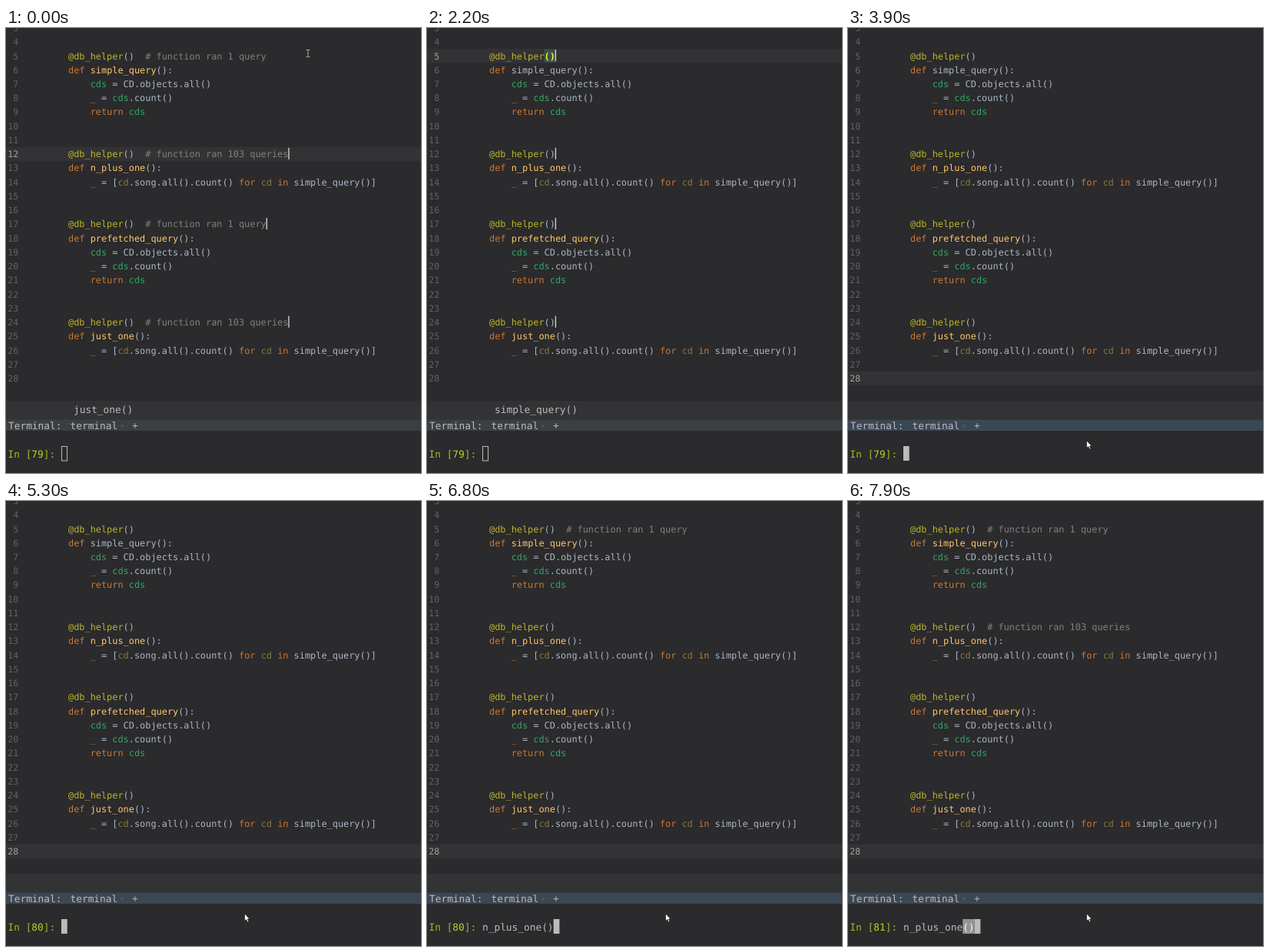
These frames come from a looping animation (540 by 579 pixels, 8000 ms). An HTML page:

```html
<!DOCTYPE html>
<html lang="en">
<head>
<meta charset="utf-8">
<title>Query counter</title>
<style>
html, body { margin: 0; width: 100%; height: 100%; overflow: hidden; background: #2b2a2c; }
svg { display: block; width: 540px; height: 579px; }
text { font-family: "DejaVu Sans Mono", "Noto Sans Mono", monospace; text-rendering: geometricPrecision; fill: #a9b7c6; }
.code { font-size: 11.9px; }
.ui { font-size: 12.82px; fill: #bbbbbb; }
.num { font-size: 11.6px; fill: #606366; }
.on { fill: #a4a3a3; }
.k { fill: #cc7832; }
.d { fill: #bbb529; }
.f { fill: #ffc66d; }
.v { fill: #2fa866; }
.o { fill: #85793a; }
.c { fill: #808080; }
.p { fill: #ffef28; font-weight: bold; }
.g { fill: #a8b820; }
.h { fill: #b9d32c; }
.w { fill: #ffffff; }
</style>
</head>
<body>
<svg id="stage" viewBox="0 0 540 579"></svg>
<script>
const LOOP = 8000;
const CW = 7.164, ROW = 18.24, LEFT = 81;   // editor grid
const TW = 7.72, PROMPT = 72;               // terminal grid
const stage = document.getElementById('stage');

const ONE = '# function ran 1 query';
const MANY = '# function ran 103 queries';
const NOTES = { 5: ONE, 12: MANY, 17: ONE, 24: MANY };
const DELETES = [700, 900, 1000, 1200, 1500, 1800];
const CALL_ALL = '    k{_} = [o{cd}.song.all().count() k{for} o{cd} k{in} simple_query()]';
const BODY = ['    v{cds} = CD.objects.all()', '    k{_} = v{cds}.count()', '    k{return} v{cds}'];
const CODE = {
  6: 'k{def} f{simple_query}():', 7: BODY[0], 8: BODY[1], 9: BODY[2],
  13: 'k{def} f{n_plus_one}():', 14: CALL_ALL,
  18: 'k{def} f{prefetched_query}():', 19: BODY[0], 20: BODY[1], 21: BODY[2],
  25: 'k{def} f{just_one}():', 26: CALL_ALL
};

// Terminal history: start, prompt number, input, delay of the bracket match
const INPUT = [
  [0, 79, ''],
  [4500, 79, 'just_one()'],
  [4700, 79, 'x = prefetched_query()'],
  [4900, 79, 'n_plus_one()'],
  [5100, 79, 'x = simple_query()'],
  [5300, 80, ''],
  [6200, 80, 'x = simple_query()', 0],
  [6400, 80, 'just_one()'],
  [6600, 80, 'x = prefetched_query()'],
  [6800, 80, 'n_plus_one()'],
  [7000, 81, ''],
  [7800, 81, 'n_plus_one()']
];

// Pointer path: time, x, y
const PATH = [
  [0, 393, 33], [100, 393, 33], [300, 390, 33], [2300, 368, 285], [2800, 330, 456],
  [3200, 316, 514], [3600, 310.5, 537], [LOOP, 310.5, 537]
];

const nb = s => s.replace(/ /g, '\u00a0');
const rowTop = n => 27.2 + ROW * (n - 5);
const rect = (x, y, w, h, fill, extra = '') =>
  `<rect x="${x}" y="${y}" width="${w}" height="${h}" fill="${fill}" ${extra}/>`;
const text = (x, y, cls, s) => `<text x="${x}" y="${y}" class="${cls}">${s}</text>`;
const span = (cls, s) => `<tspan class="${cls}">${s}</tspan>`;
const paint = s => nb(s).replace(/([a-z])\{([^}]*)\}/g, (_, cls, word) => span(cls, word));
const caret = (n, col) => rect(LEFT + col * CW - 0.3, rowTop(n) + 1, 1.4, 15, '#d0d0d0');

function note(n, t) {
  if ((n === 5 && t >= 5500) || (n === 12 && t >= 7200)) return '  ' + NOTES[n];
  const gone = DELETES.filter(d => t >= d).length;
  if (gone === 0) return '  ' + NOTES[n];
  if (gone > 5) return '';
  const words = NOTES[n].split(' ').slice(0, 5 - gone);
  return '  ' + words.map(w => w + ' ').join('');
}

function pointerAt(t) {
  const i = PATH.findIndex(p => p[0] > t);
  const a = PATH[i - 1], b = PATH[i];
  const u = (t - a[0]) / (b[0] - a[0]);
  return [a[1] + (b[1] - a[1]) * u, a[2] + (b[2] - a[2]) * u];
}

function pointer(t, hidden) {
  if (t >= 1800 && t < 2400) return '';
  const [x, y] = pointerAt(t);
  if (y > 505 && !hidden) {
    return `<path transform="translate(${x} ${y})" d="M0 0V9.4L2.2 7.5L3.7 11L5.3 10.3L3.8 6.9H6.6Z" fill="#fff" stroke="#111" stroke-width=".6"/>`;
  }
  const dy = hidden ? 1 : 0;
  return `<path transform="translate(${x + (hidden ? 1 : 0)} ${y + dy})" d="M-2.4 -4.6H-.6L0 -4L.6 -4.6H2.4M0 -4V4M-2.4 4.6H-.6L0 4L.6 4.6H2.4" fill="none" stroke="#b4b4b4" stroke-width="1"/>`;
}

function editor(t, hidden) {
  const current = t < 100 ? 12 : t < 2800 ? 5 : 28;
  const multi = t < 2800;
  const matched = t >= 2000 && multi;
  const dim = t >= 1800 && t < 5700;
  let s = rect(0, rowTop(current), 540, ROW, '#333234');
  if (matched) s += rect(LEFT + 10 * CW, rowTop(5) + 0.5, 2 * CW, 17, '#3b514d');
  for (let n = 3; n <= 28; n++) {
    const y = rowTop(n) + 13.3;
    const label = String(n);
    s += text(16.3 - label.length * 6.98, y, n === current ? 'num on' : 'num', label);
    if (NOTES[n]) {
      const c = note(n, t);
      const parens = matched && n === 5 ? 'p{()}' : '()';
      s += text(LEFT, y, 'code', paint(`d{@db_helper}${parens}c{${c}}`));
      if (multi && (n !== 5 || t >= 100)) s += caret(n, 12 + c.length);
    } else if (CODE[n]) {
      const line = n === 6 && dim ? CODE[n].replace('f{simple_query}', 'simple_query') : CODE[n];
      s += text(LEFT, y, 'code', paint(line));
    }
  }
  if (hidden || (t >= 2800 && t < 3700)) s += caret(28, 0);
  return s;
}

function terminal(t) {
  const focus = t >= 3700;
  const crumb = t < 1600 ? 'just_one()' : t < 2900 ? 'simple_query()' : '';
  const [start, num, input, delay = 100] = INPUT.filter(e => t >= e[0]).pop();
  const end = PROMPT + input.length * TW;
  const match = input && t >= start + delay;
  let s = rect(0, 485, 540, 24.5, '#313335') + text(88, 501.3, 'ui', crumb);
  s += rect(0, 509.5, 540, 14.5, focus ? '#3c4754' : '#3c3f41');
  s += text(3, 522, 'ui', 'Terminal:') + text(83.5, 522, 'ui', 'terminal');
  s += '<path d="M149.5 516L153 519.5M153 516L149.5 519.5" stroke="#686b6d" stroke-width=".7"/>';
  s += '<path d="M164.7 517.6H171.1M167.9 514.4V520.8" stroke="#bbb" stroke-width="1"/>';
  s += text(2.5, 558.7, 'ui', span('g', nb('In [')) + span('h', num) + span('g', ']:'));
  if (match) s += rect(end - 2 * TW, 544, 2 * TW, 19, '#949494');
  const shown = match ? nb(input.slice(0, -2)) + span('w', '()') : nb(input);
  s += text(PROMPT, 558.7, 'ui', shown);
  s += focus
    ? rect(end, 544, TW, 19, '#bbbbbb')
    : rect(72.5, 544.5, 7, 18.5, 'none', 'stroke="#bbbbbb"');
  return s;
}

let last = '';
function draw(t) {
  const hidden = (t >= 5500 && t < 5800) || (t >= 7200 && t < 7600);
  const s = rect(0, 0, 540, 579, '#2b2a2c') + editor(t, hidden) +
    (hidden ? rect(0, 555, 540, 24, '#313335') : terminal(t)) + pointer(t, hidden);
  if (s !== last) stage.innerHTML = last = s;
}

let begin;
function tick(now) {
  begin ??= now;
  draw((now - begin) % LOOP);
  requestAnimationFrame(tick);
}
draw(0);
requestAnimationFrame(tick);
</script>
</body>
</html>
```
